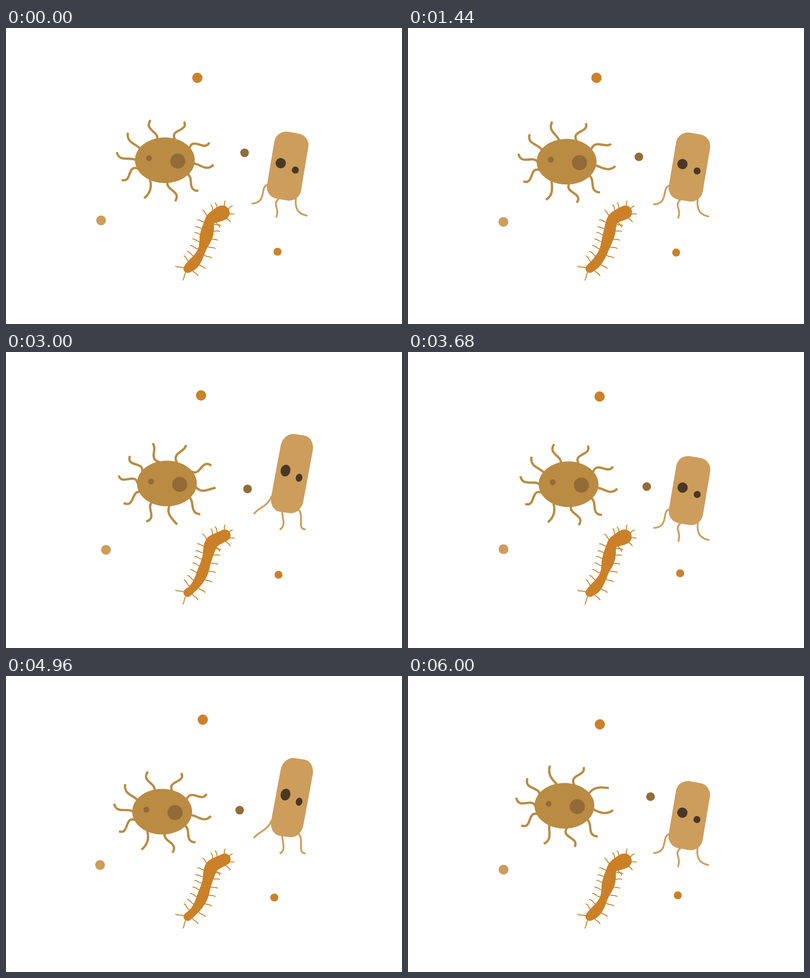
These frames come from a looping animation (800 by 600 pixels, 6.04 s). An HTML page with a canvas:

```html
<!DOCTYPE html>
<html lang="en">
<head>
<meta charset="utf-8">
<title>Microbes</title>
<style>
html, body { margin: 0; width: 100%; height: 100%; overflow: hidden; background: #fff; }
canvas { display: block; width: 800px; height: 600px; }
</style>
</head>
<body>
<canvas id="stage" width="800" height="600"></canvas>
<script>
const ctx = document.getElementById('stage').getContext('2d');
const LOOP = 6040, STEP = 40;
const HOP = 1960;      // rod and worm cycle
const PADDLE = 1253;   // oval leg cycle
const ORANGE = '#cb8129', SAND = '#cd9d5c', OCHRE = '#ba8b42', BROWN = '#936b37', DARK = '#4a3824';

const { PI, sin, cos, hypot, min, max, pow, exp } = Math;
const rad = deg => deg * PI / 180;
const mix = (a, b, w) => a + (b - a) * w;

// Smooth monotone interpolation of rows [time, value, value, ...]
function interp(rows, t) {
  const last = rows.length - 1;
  let i = 0;
  while (i < last - 1 && t > rows[i + 1][0]) i++;
  const a = rows[i], b = rows[i + 1], h = b[0] - a[0];
  const u = min(1, max(0, (t - a[0]) / h));
  const slope = (k, c) => (rows[k + 1][c] - rows[k][c]) / (rows[k + 1][0] - rows[k][0]);
  const tangent = (k, c) => {
    if (k === 0) return slope(0, c);
    if (k === last) return slope(last - 1, c);
    const p = slope(k - 1, c), q = slope(k, c);
    return p * q <= 0 ? 0 : 2 * p * q / (p + q);
  };
  const u2 = u * u, u3 = u2 * u;
  return a.slice(1).map((v, j) => {
    const c = j + 1;
    return v * (2 * u3 - 3 * u2 + 1) + b[c] * (3 * u2 - 2 * u3)
      + h * (tangent(i, c) * (u3 - 2 * u2 + u) + tangent(i + 1, c) * (u3 - u2));
  });
}

function disc(x, y, r, color) {
  ctx.fillStyle = color;
  ctx.beginPath();
  ctx.arc(x, y, r, 0, 2 * PI);
  ctx.fill();
}

function pen(color, width) {
  ctx.strokeStyle = color;
  ctx.lineWidth = width;
}

// Line from (x, y) to (tx, ty), bent sideways by p and q at its thirds
function bentLine(x, y, tx, ty, p, q) {
  const dx = tx - x, dy = ty - y, len = hypot(dx, dy);
  const nx = -dy / len, ny = dx / len;
  ctx.beginPath();
  ctx.moveTo(x, y);
  ctx.bezierCurveTo(x + dx / 3 + nx * p, y + dy / 3 + ny * p,
    x + dx * 2 / 3 + nx * q, y + dy * 2 / 3 + ny * q, tx, ty);
  ctx.stroke();
}

// Drifting: places visited at shared times

const times = [0, 760, 2200, 3000, 4360, 4960, 6000];
const route = (...places) => places.map((p, i) => [times[i], ...p]);

const dots = [
  { r: 10.4, color: ORANGE, path: route([386.5, 101], [385, 105], [377, 93.5],
    [394, 88], [380, 92.5], [397.5, 88.5], [387.5, 98]) },
  { r: 9.9, color: SAND, path: route([192, 390], [190, 383], [198, 405],
    [202, 401], [184, 398], [190, 383], [193, 392.5]) },
  { r: 8.7, color: BROWN, path: route([482, 253], [467.5, 243.5], [466, 282],
    [488, 277.5], [474.5, 270], [472, 272], [490, 244.5]) },
  { r: 8.1, color: ORANGE, path: route([548.5, 453.5], [544, 468.5], [540.5, 439.5],
    [550.5, 451.5], [548, 445.5], [542, 449], [545, 444.5]) }
];
const ovalPath = route([321, 268], [322.5, 277], [318, 264],
  [325, 266.5], [322.5, 270], [315.5, 275], [316, 263]);

function drawDots(t) {
  for (const d of dots) {
    const [x, y] = interp(d.path, t);
    disc(x, y, d.r, d.color);
  }
}

// Oval microbe; legs in degrees: root, tip, wave at rest, wave at mid stroke

const ovalLegs = [
  [-105, -107, 20, -80], [-70, -67, -110, -60], [-33, -25, -100, 70], [9, 6, 180, 130],
  [39, 47, -160, -170], [85, 78, 25, 155], [121, 115, -25, 30],
  [158, 152, 70, 30], [180, 191, 10, 80], [212, 221, -5, 60]
];

function drawOval(t) {
  const [x, y] = interp(ovalPath, t);
  const phase = t % PADDLE / PADDLE;
  const w = pow(sin(PI * phase), 2);
  const puff = .045 * exp(-pow((phase - .6) / .1, 2));
  ctx.save();
  ctx.translate(x, y);
  ctx.save();
  ctx.scale(1 - puff * .35, 1 + puff);
  pen(OCHRE, 4.6);
  for (const leg of ovalLegs) {
    const [root, tip, rest, mid] = leg.map(rad);
    const wave = mix(rest, mid, w);
    bentLine(59 * cos(root), 45 * sin(root), 99 * cos(tip), 85 * sin(tip),
      21 * sin(wave), 21 * sin(wave - rad(130)));
  }
  ctx.beginPath();
  ctx.ellipse(0, 0, 60.5, 46.2, 0, 0, 2 * PI);
  ctx.fillStyle = OCHRE;
  ctx.fill();
  ctx.restore();
  disc(26, 1.8, 15.3, BROWN);
  disc(-32, -4, 6, BROWN);
  ctx.restore();
}

// Hopping rod: time, centre y, stretch along the line of the hop

const HOP_TILT = rad(14.6), LEAN = rad(-5.1);
const hop = [
  [0, 280, 1], [120, 283, 1], [240, 302.5, .935], [440, 317, .735], [640, 231, 1.165],
  [820, 212, 1.165], [1040, 246.5, 1.165], [1280, 282, 1], [HOP, 280, 1]
];
// root in the body, then curve offsets when relaxed and when stretched
const rodLegs = [
  { root: [-34, 44], rest: [-16, 4, 0, 37, -32, 38], long: [-9, 22, -22, 20, -36, 36] },
  { root: [-6, 67], rest: [-16, 14, 2, 18, -6, 39], long: [0, 18, 9, 28, -5, 38] },
  { root: [27, 60], rest: [-3, 26, 6, 33, 23, 37], long: [14, 14, -4, 40, 15, 41] }
];

function drawRod(t) {
  const [y, sy] = interp(hop, t % HOP);
  const x = 569 - (y - 280) * .26;
  const body = new DOMMatrix().translate(x, y).rotate(14.6)
    .scale(pow(sy, -.4), sy).rotate(-5.1);
  const w = min(1, max(0, (sy - 1) / .165));
  const spread = min(1, sy);
  pen(SAND, 3.6);
  for (const { root, rest, long } of rodLegs) {
    const base = body.transformPoint(new DOMPoint(...root));
    const curve = rest.map((v, i) => {
      const d = mix(v, long[i], w);
      return i % 2 ? base.y + d : base.x + d * spread;
    });
    ctx.beginPath();
    ctx.moveTo(base.x, base.y);
    ctx.bezierCurveTo(...curve);
    ctx.stroke();
  }
  ctx.save();
  ctx.setTransform(body);
  ctx.fillStyle = SAND;
  ctx.beginPath();
  ctx.roundRect(-34.8, -68.8, 69.6, 137.6, 24);
  ctx.fill();
  disc(-14.8, -3.6, 10.4, DARK);
  disc(16.6, 5.3, 7.1, DARK);
  ctx.restore();
}

// Worm: a bulge runs along the spine, hairs end at a fixed distance from it

const spine = [
  [0, 437, 374.5], [.2, 412.5, 389], [.45, 405, 420], [.7, 394, 454],
  [.85, 381, 475], [1, 366.5, 488.5]
];
const HAIR = 25;

function drawWorm(t) {
  const w = pow(sin(PI * (t % HOP / HOP - .03)), 4);
  const at = s => {
    const [x, y] = interp(spine, s);
    const shift = w * pow(1 - s, 3);
    return [x + 5 * shift, y - 3 * shift];
  };
  const hair = (s, angle, bend) => {
    const [x, y] = interp(spine, s);
    const c = cos(angle), n = sin(angle);
    bentLine(x + 8 * c, y + 8 * n, x + HAIR * c, y + HAIR * n, bend, -bend);
  };
  const heading = s => {
    const [ax, ay] = interp(spine, s - .03), [bx, by] = interp(spine, s + .03);
    return Math.atan2(by - ay, bx - ax);
  };

  pen('#c98a36', 2);
  for (let i = 0; i < 10; i++) {
    const s = .03 + .87 * pow(i / 9, 1.2);
    hair(s, heading(s) + PI / 2, -4);
  }
  for (let i = 0; i < 8; i++) {
    const s = .13 + .117 * i;
    hair(s, heading(s) - PI / 2, 4);
  }
  for (let i = 0; i < 4; i++) hair(0, rad(-76 + 42 * i), 3);
  for (let i = 0; i < 2; i++) hair(1, rad(113 + 81 * i), 3);

  for (let s = 0; s <= 1; s += .006) {
    disc(...at(s), 12.8 - 4.5 * s + (2 - 3 * w) * cos(4.5 * PI * s), ORANGE);
  }
}

function draw(t) {
  ctx.fillStyle = '#fff';
  ctx.fillRect(0, 0, 800, 600);
  drawDots(t);
  drawOval(t);
  drawRod(t);
  drawWorm(t);
}

const start = performance.now();
function tick() {
  const ms = (performance.now() - start) % LOOP;
  draw(Math.floor(ms / STEP) * STEP);
  requestAnimationFrame(tick);
}
tick();
</script>
</body>
</html>
```
